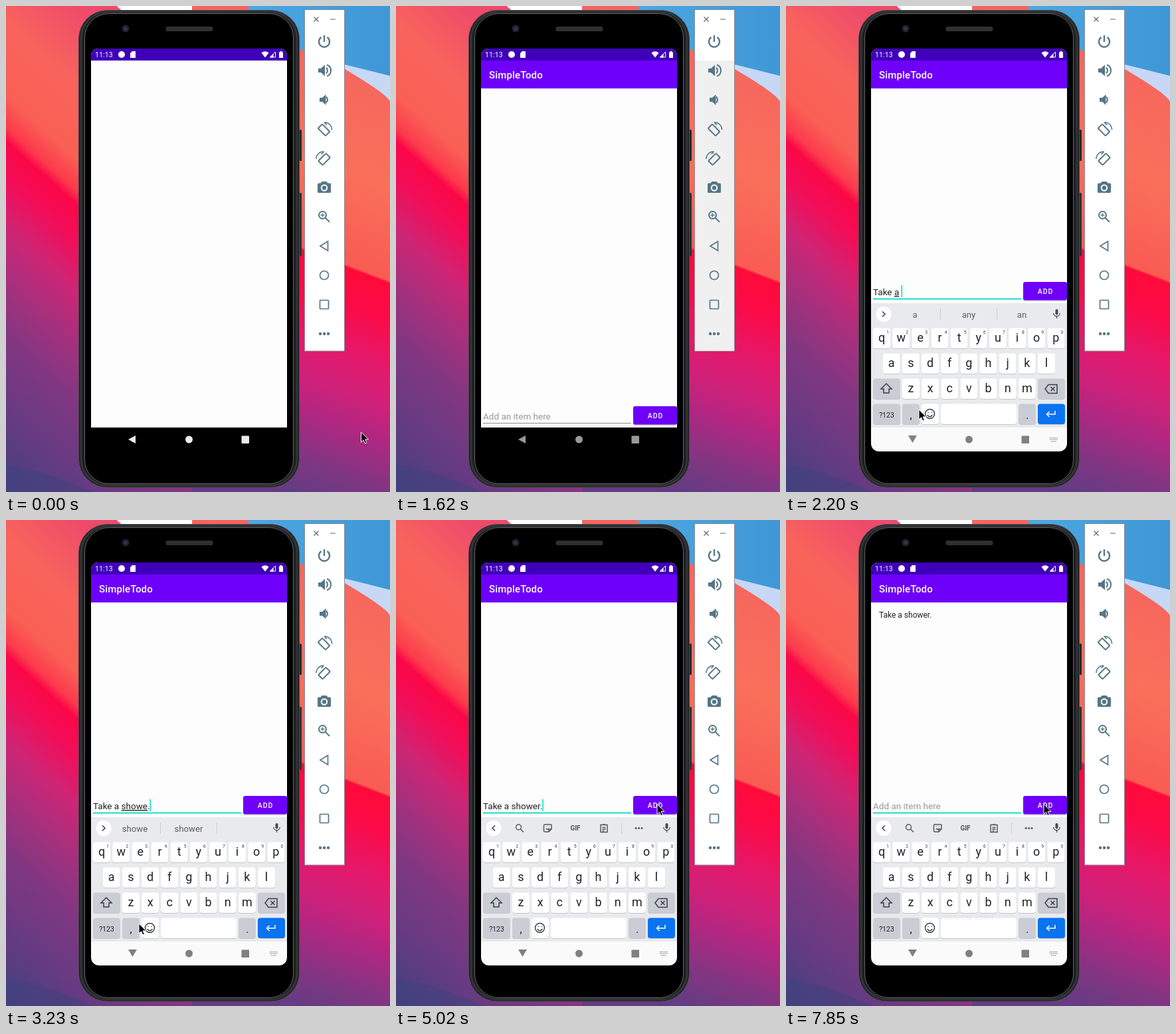
Animation of 578x731 px, one loop 8 s. Source, as an HTML page:

```html
<!DOCTYPE html>
<html lang="en">
<head>
<meta charset="utf-8">
<title>Todo app demo</title>
<style>
  html, body { margin: 0; height: 100%; overflow: hidden; }
  svg { display: block; width: 578px; height: 731px; font-family: Roboto, sans-serif; }
  text { white-space: pre; }
  .mid { text-anchor: middle; }
  .line { fill: none; stroke-width: 2; }
</style>
</head>
<body>
<svg viewBox="0 0 578 731">
  <defs>
    <linearGradient id="left" gradientUnits="userSpaceOnUse" x1="0" y1="-100" x2="0" y2="731">
      <stop offset="0" stop-color="#ee4a6b"/><stop offset=".15" stop-color="#f8645c"/>
      <stop offset=".28" stop-color="#fa6055"/><stop offset=".34" stop-color="#fc3a4c"/>
      <stop offset=".365" stop-color="#fb0747"/><stop offset=".43" stop-color="#f30d58"/>
      <stop offset=".52" stop-color="#ce2575"/><stop offset=".62" stop-color="#a5307d"/>
      <stop offset=".72" stop-color="#823781"/><stop offset=".87" stop-color="#633b82"/>
      <stop offset="1" stop-color="#41427e"/>
    </linearGradient>
    <linearGradient id="right" gradientUnits="userSpaceOnUse" x1="0" y1="0" x2="0" y2="731">
      <stop offset="0" stop-color="#f5625f"/><stop offset=".3" stop-color="#f9705a"/>
      <stop offset=".495" stop-color="#f95b53"/><stop offset=".5" stop-color="#ff0a3a"/>
      <stop offset=".58" stop-color="#fa0b49"/><stop offset=".67" stop-color="#e6186a"/>
      <stop offset=".76" stop-color="#cf217a"/><stop offset=".83" stop-color="#b02781"/>
      <stop offset=".92" stop-color="#843582"/><stop offset="1" stop-color="#643c83"/>
    </linearGradient>
    <linearGradient id="sky"><stop offset="0" stop-color="#4ba8e2"/><stop offset="1" stop-color="#3f97d6"/></linearGradient>
    <g id="mic">
      <rect x="-2" y="-7" width="4" height="8.500" rx="2"/>
      <path d="M-4.700-1a4.700 4.700 0 0 0 9.400 0M0 4v3" fill="none" stroke="#4a4d51" stroke-width="1.300"/>
    </g>
  </defs>

  <!-- wallpaper -->
  <rect y="-150" width="290" height="1000" fill="url(#left)" transform="skewY(42)"/>
  <path d="M0 731V690Q60 698 130 731z" fill="#41427e" opacity=".5"/>
  <rect x="-162" y="-100" width="300" height="950" fill="url(#right)" transform="translate(442) skewY(21)"/>
  <path d="M362 0Q442 55 510 95T578 145V0z" fill="#c6d8f6"/>
  <path d="M362 0Q435 78 510 88L578 105V0z" fill="url(#sky)"/>

  <!-- phone -->
  <rect x="440" y="186" width="5" height="47" rx="1.500" fill="#26282c"/>
  <rect x="440" y="281" width="5" height="95" rx="1.500" fill="#2f3136"/>
  <rect x="109.500" y="6.500" width="332" height="717.500" rx="43" fill="#1d1e20" stroke="#4b4c50"/>
  <rect x="113" y="9" width="325" height="712" rx="40" fill="none" stroke="#343539" stroke-width="3"/>
  <rect x="118.500" y="11.500" width="314" height="707" rx="36" stroke="#626469"/>
  <circle cx="180" cy="34" r="5.500" fill="#222329"/><circle cx="180" cy="34" r="2.500" fill="#303856"/>
  <rect x="240.500" y="31" width="71" height="7" rx="3" fill="#303030"/>

  <!-- screen -->
  <path d="M128 634V75a11 11 0 0 1 11-11H412a11 11 0 0 1 11 11V634z" fill="#fdfdfd"/>
  <path d="M128 82V75a11 11 0 0 1 11-11H412a11 11 0 0 1 11 11V82z" fill="#4000ba"/>
  <g fill="#fff">
    <text x="134" y="77" font-size="10.500" letter-spacing=".15">11:13</text>
    <circle cx="174" cy="73" r="5"/>
    <path d="M187 71l3-3h5v10h-8zM384.500 70.500q5.500-4.500 11 0L390 77.500zM411 69.500h1.500v-1.500h3v1.500H417V78h-6z"/>
    <path d="M397.500 77h8v-8z" fill="none" stroke="#fff"/><path d="M397 77.500h5.500v-6z"/>
  </g>

  <g id="app">
    <path d="M128 82H423V124H128z" fill="#6e00fa"/>
    <text x="140" y="109" font-size="15" font-weight="500" letter-spacing=".15" fill="#fff">SimpleTodo</text>
    <text id="item" x="140" y="147" font-size="12" fill="#222">Take a shower.</text>
    <g id="field">
      <rect id="underline" x="131" width="223"/>
      <text id="hint" x="131" y="622" font-size="13.500" fill="#999">Add an item here</text>
      <text id="entry" x="131" y="622" font-size="13.500" fill="#222"><tspan></tspan><tspan text-decoration="underline"></tspan><tspan></tspan></text>
      <rect id="caret" y="607" width="1.500" height="18" fill="#03dac5"/>
      <rect x="357" y="603" width="66" height="28" rx="3" fill="#000" opacity=".2"/>
      <rect id="button" x="357" y="602" width="66" height="27.500" rx="3"/>
      <text class="mid" x="390.500" y="620" font-size="10.500" font-weight="500" letter-spacing=".95" fill="#fff">ADD</text>
    </g>
  </g>

  <g id="nav">
    <path id="back" d="M184 652l11-6v12z"/>
    <circle cx="275.500" cy="652" r="5.500"/><rect x="354.500" y="646.500" width="11.500" height="11.500" rx="1"/>
  </g>

  <g id="keyboard">
    <path d="M128 447H423V634H128z" fill="#e8eaed"/>
    <path d="M128 634H423V658a12 12 0 0 1-12 12H140a12 12 0 0 1-12-12z" fill="#fafafa"/>
    <g fill="#808080">
      <path d="M184 646h13l-6.500 11z"/><circle cx="275.500" cy="652" r="5.500"/>
      <rect x="354.500" y="646.500" width="11.500" height="11.500"/>
      <path d="M397 649.500h12M397 652h12M399 655h8" stroke="#999" stroke-width="1.500" stroke-dasharray="1.500 1"/>
    </g>
    <circle cx="147" cy="463.500" r="11.500" fill="#fff"/>
    <path id="chevron" d="M-2-4l4 4-4 4" fill="none" stroke="#444" stroke-width="1.600"/>
    <use href="#mic" x="407.500" y="463" fill="#4a4d51"/>
    <g id="words" class="mid" font-size="13.200" fill="#5b5f64">
      <text x="194" y="468.500"></text><text x="275" y="468.500"></text><text x="355" y="468.500"></text>
      <path d="M232.500 455v17M317.500 455v17" stroke="#cbcdd1"/>
    </g>
    <g id="tools" fill="none" stroke="#55585d" stroke-width="1.500">
      <circle cx="184.500" cy="462" r="4"/><path d="M187.500 465l4.500 4.500"/>
      <path d="M224 458h9q1 0 1 1v6l-4 4h-6q-1.500 0-1.500-1.500v-8q0-1.500 1.500-1.500M234 465h-4v4M226 464q2 2.500 4 0M226 461h.5M230 461h.5"/>
      <text class="mid" x="270" y="467" font-size="10" font-weight="700" stroke="none" fill="#55585d">GIF</text>
      <path d="M308 458.500h10v11h-10zM311 458h4M310.500 462.500h5M310.500 465h5M310.500 467.500h3"/>
      <path d="M339.500 455v17" stroke="#cbcdd1" stroke-width="1"/>
      <path d="M361 463.500h.1M365.500 463.500h.1M370 463.500h.1" stroke-width="3" stroke-linecap="round"/>
    </g>
    <g id="keys" class="mid" fill="#202124"></g>
    <g fill="none" stroke="#3c4043" stroke-width="1.500">
      <path d="M151 568l-8 8h4v6h8v-6h4z"/>
      <path d="M390 576l5-6.500h13v13h-13zM398.500 573l6 6m0-6l-6 6"/>
      <circle cx="216.500" cy="613.500" r="7"/><path d="M213 615.500q3.500 4.500 7 0M214 611.500h.1M219 611.500h.1" stroke-linecap="round"/>
      <path d="M405 609v5h-12m3.500-4l-4 4 4 4" stroke="#fff"/>
    </g>
  </g>

  <g id="toast">
    <rect x="220" y="579" width="111" height="37" rx="18.500" fill="#eee" opacity=".95"/>
    <text class="mid" x="275.500" y="602" font-size="10.500" fill="#222">Item was added</text>
  </g>

  <!-- emulator controls -->
  <rect x="449.500" y="5.500" width="60" height="513.500" fill="#fff" stroke="#8b8b92"/>
  <path id="shade" d="M450 82h59V518.500h-59z" fill="#f0f0f0"/>
  <path d="M463.500 16.500l7 7m0-7l-7 7M488 20h8" stroke="#666" stroke-width="1.200"/>
  <g class="line" fill="none" stroke="#557686">
    <path d="M479 44v10M474.500 47a8 8 0 1 0 9 0" stroke-width="2.300"/>
    <path d="M482 92.500q4 4.500 0 9M483 88.500a9 9 0 0 1 0 17" />
    <path d="M482 136.500q4 4.500 0 9"/>
    <g id="turn">
      <rect x="-4.500" y="-8" width="9" height="16" rx="1" transform="translate(478.500 186.500) rotate(-45)"/>
      <path d="M479 175a11 11 0 0 1 11.500 11M479 175l4 4" stroke-width="1.600"/>
    </g>
    <use href="#turn" transform="translate(957.500 44) scale(-1 1)"/>
    <circle cx="476.500" cy="314.500" r="5.500"/><path d="M480.500 318.500l6.500 6.500"/>
    <path d="M473.500 314.500h6m-3-3v6" stroke-width="1.300"/>
    <path d="M473 361l11.500-7v14z" stroke-width="1.700"/>
    <circle cx="479" cy="405" r="6.500" stroke-width="1.700"/>
    <rect x="472.500" y="442.500" width="13" height="13" rx="1" stroke-width="1.700"/>
    <path d="M473 493h.1M479 493h.1M485 493h.1" stroke-width="4.400" stroke-linecap="round"/>
  </g>
  <g fill="#557686">
    <path d="M470 94h4l6-5.500v17L474 100h-4zM472 138h4l5.500-5v16l-5.500-5h-4z"/>
    <path d="M475.500 264h7l2 2.500h3q1.500 0 1.500 1.500v11.500q0 1.500-1.500 1.500h-17q-1.500 0-1.500-1.500V268q0-1.500 1.500-1.500h3z"/>
    <circle cx="479" cy="273.500" r="4.200" fill="#557686" stroke="#fff" stroke-width="2"/>
  </g>

  <path id="cursor" d="M0 0V15l3.500-3.200 2.300 5.200 2.600-1.100-2.300-5H11z" stroke="#fff" stroke-width="1"/>
</svg>

<script>
const LOOP = 8000;
const $ = id => document.getElementById(id);

// Keyboard
function key(x, y, width, label, fill = '#fff', size = 18, dy = 20) {
  return `<rect x="${x}" y="${y + 1}" width="${width}" height="30.500" rx="4" fill="#c3c6ca"/>
    <rect x="${x}" y="${y}" width="${width}" height="30.500" rx="4" fill="${fill}"/>
    <text x="${x + width / 2}" y="${y + dy}" font-size="${size}">${label}</text>`;
}
const PITCH = 29.15, GREY = '#cacdd3';
let keys = '';
[['qwertyuiop', 131, 484.5], ['asdfghjkl', 145.7, 522.5], ['zxcvbnm', 175, 560.5]].forEach(([row, x, y], r) => {
  [...row].forEach((letter, i) => {
    keys += key(x + i * PITCH, y, 26, letter);
    if (r === 0) keys += `<text x="${x + i * PITCH + 22}" y="493" font-size="7" fill="#444">${(i + 1) % 10}</text>`;
  });
});
keys += key(131, 560.5, 41, '', GREY) + key(379, 560.5, 41, '', GREY)
  + key(131, 598.5, 41, '?123', GREY, 10.5) + key(175, 598.5, 26, ',', GREY, 16, 22)
  + key(204, 598.5, 26, '') + key(233, 598.5, 114, '')
  + key(350, 598.5, 26, '.', GREY, 16, 22) + key(379, 598.5, 41, '', '#0a73f0');
$('keys').innerHTML = keys;

// Tracks: [start, ...values], each held until the next start
const typing = [
  [0, ['', '', ''], []],
  [1750, ['', 'T', ''], ['T', 'The', 'To']],
  [1900, ['', 'Tak', ''], ['Tak', 'Take', 'Taking']],
  [2050, ['Take ', 'a', ''], ['a', 'any', 'an']],
  [2200, ['Take ', 'a', ' '], ['a', 'any', 'an']],
  [2350, ['Take a ', 's', ''], ['s', 'shower', 'look']],
  [2500, ['Take a ', 'sh', ''], ['sh', 'shower', 'she']],
  [2650, ['Take a ', 'sho', ''], ['sho', 'shower', 'shot']],
  [2800, ['Take a ', 'show', ''], ['show', 'shower', 'shows']],
  [2940, ['Take a ', 'showe', ''], ['showe', 'shower', '']],
  [3230, ['Take a ', 'showe', '.'], ['showe', 'shower', '']],
  [3530, ['Take a ', 'showe', ''], ['showe', 'shower', '']],
  [3680, ['Take a ', 'shower', ''], ['shower', 'showers', 'showered']],
  [3970, ['Take a ', 'shower', '.'], ['shower', 'showers', 'showered']],
  [4120, ['Take a shower.', '', ''], null],
  [5620, ['', '', ''], null],
];
const pointer = [
  [0, 534.5, 641], [590, 480, 649], [740, 410, 651], [1040, 360, 640], [1190, 300, 628],
  [1340, 250, 618], [1490, -50, 0], [1750, 200, 607], [3530, -50, 0], [4420, 300, 570],
  [4570, 352, 500], [4720, 402, 442], [4870, 398, 430], [5020, 393, 427.5], [5320, 388, 427.5],
];
const fade = [[0, 0], [440, .4], [590, .8], [740, 1]];
const toast = [[0, 0], [5770, .5], [5910, 1], [7410, .75], [7560, .45], [7710, .2], [7850, .05]];
const blink = [
  [0, 0], [1750, 1], [4570, 0], [5020, 1], [5470, 0], [5620, 1],
  [5910, 0], [6360, 1], [6960, 0], [7410, 1], [7850, 0],
];

const at = (track, t) => track.filter(([start]) => start <= t).pop().slice(1);
const show = (id, opacity) => $(id).setAttribute('opacity', +opacity);
const set = (id, values) => Object.entries(values).forEach(([name, value]) => $(id).setAttribute(name, value));
const fillTexts = (nodes, texts) => nodes.forEach((node, i) => {
  if (node.textContent !== texts[i]) node.textContent = texts[i] ?? '';
});

function draw(t) {
  const open = t >= 1750;
  const [parts, words] = at(typing, t);
  const [x, y] = at(pointer, t);

  show('app', at(fade, t)[0]);
  show('item', t >= 5620);
  show('keyboard', open);
  show('nav', !open);
  show('toast', at(toast, t)[0]);
  show('shade', t >= 1490 && t < 1750);
  show('hint', !parts.join(''));
  show('words', !!words);
  show('tools', !words);
  show('caret', at(blink, t)[0]);

  set('nav', { fill: t < 150 ? '#ececec' : '#999' });
  set('field', { transform: `translate(0 ${open ? -187 : 0})` });
  set('underline', open ? { y: 626.7, height: 1.8, fill: '#03dac5' } : { y: 627, height: 1, fill: '#8c8c8c' });
  set('button', { fill: t >= 5470 && t < 5770 ? '#8630fb' : '#6e00fa' });
  set('chevron', { transform: `translate(147 463.5) scale(${words ? 1 : -1} 1)` });
  set('cursor', { transform: `translate(${x} ${y})` });

  fillTexts(document.querySelectorAll('#entry tspan'), parts);
  if (words) fillTexts(document.querySelectorAll('#words text'), words);
  set('caret', { x: 131 + (parts.join('') ? $('entry').getComputedTextLength() : 0) });
}

function tick(now) {
  draw(now % LOOP);
  requestAnimationFrame(tick);
}
draw(0);
requestAnimationFrame(tick);
</script>
</body>
</html>
```
